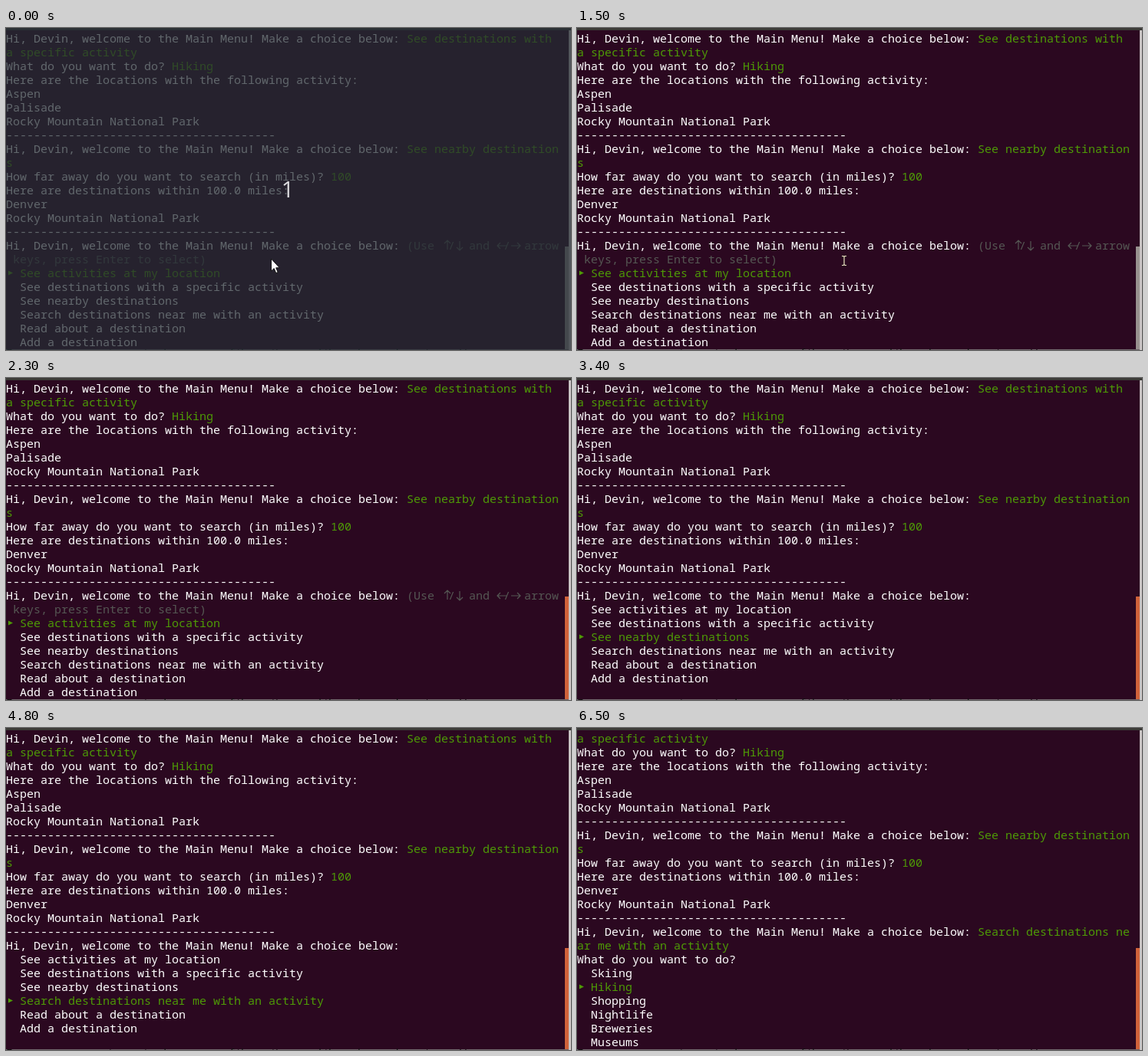
These frames come from a looping animation (736 by 420 pixels, 8 s). An HTML page:

```html
<!DOCTYPE html>
<html lang="en">
<head>
<meta charset="utf-8">
<title>Terminal menu</title>
<style>
  html, body { margin: 0; width: 100%; height: 100%; overflow: hidden; background: #2b0820; }
  svg { display: block; width: 736px; height: 420px; }
  #rows text { font: 15px "Noto Sans Mono", "DejaVu Sans Mono", monospace; white-space: pre; }
  .plain { fill: #fff; }
  .pick { fill: #4e9a06; }
  .hint { fill: #555753; }
  .arrows { fill: none; stroke: #555753; stroke-width: 1.2; }
</style>
</head>
<body>
<svg viewBox="0 0 736 420">
  <rect width="736" height="420" fill="#2b0820"/>
  <g id="rows"></g>
  <rect y="419" width="733" height="1" fill="#6f666b"/>
  <text x="0" y="429" font-family="Open Sans, sans-serif" font-size="15" fill="#111">Every menu prompts you to choose one of the options and then shows places to go. Use arrows</text>
  <rect width="736" height="3" fill="#3c3b37"/>
  <rect id="bar" x="728" y="285" width="5" height="134"/>
  <rect x="733" y="3" width="3" height="417" fill="#c9c4c4"/>
  <g id="beam" fill="none">
    <path d="M345 297.5h2l1 1l1-1h2M345 309.5h2l1-1l1 1h2M348 298v11" stroke="#e8e6c0" stroke-width="1.2"/>
  </g>
  <g id="countdown">
    <rect width="736" height="420" fill="#242d34" opacity=".72"/>
    <text x="367" y="221" text-anchor="middle" font-family="Open Sans, sans-serif" font-size="29" fill="#dcdcdf">1</text>
    <path d="M345.5 301v16l3.7-3.4 2.5 6 2.5-1-2.5-5.8h4.6z" fill="#fff" stroke="#111"/>
  </g>
</svg>
<script>
const LOOP = 8000, CELL = 9, LINE = 18;
const $ = id => document.getElementById(id);
const rows = $("rows");

const GREETING = "Hi, Devin, welcome to the Main Menu! Make a choice below: ";
const QUESTION = "What do you want to do? ";
const RULE = "-".repeat(39);
const HINT = "(Use  /  and  /  arrow keys, press Enter to select)";
const MENU = ["See activities at my location", "See destinations with a specific activity",
  "See nearby destinations", "Search destinations near me with an activity",
  "Read about a destination", "Add a destination"];
const ACTIVITIES = ["Skiing", "Hiking", "Shopping", "Nightlife", "Breweries", "Museums"];

// Each row is a plain part followed by an answer part.
const HISTORY = [
  [GREETING, "See destinations with"],
  ["", "a specific activity"],
  [QUESTION, "Hiking"],
  ["Here are the locations with the following activity:"],
  ["Aspen"], ["Palisade"], ["Rocky Mountain National Park"],
  [RULE],
  [GREETING, "See nearby destination"],
  ["", "s"],
  ["How far away do you want to search (in miles)? ", "100"],
  ["Here are destinations within 100.0 miles:"],
  ["Denver"], ["Rocky Mountain National Park"],
  [RULE]
];
const SEARCHED = [...HISTORY.slice(1), [GREETING, "Search destinations ne"], ["", "ar me with an activity"]];

// Start time, screen and selected option
const STEPS = [
  [0, "menu", 0], [2500, "menu", 1], [3400, "menu", 2], [4000, "menu", 3],
  [4900, "activities", 0], [6500, "activities", 1]
];

const write = (text, col, row, kind) => text
  ? `<text class="${kind}" x="${col * CELL}" y="${19 + row * LINE}">${text}</text>` : "";

function arrows(col, row) {
  const x = col * CELL, y = 14 + row * LINE;
  return `<path class="arrows" d="M${x + 53} ${y + 5}v-12m-4 4l4-4 4 4
    M${x + 69} ${y - 6}v12m-4-4l4 4 4-4
    M${x + 130} ${y}h-12m4-4l-4 4 4 4
    M${x + 136} ${y}h12m-4-4l4 4-4 4"/>`;
}

function hint(col, row) {
  const room = 80 - col;
  return write(HINT.slice(0, room), col, row, "hint")
    + write(HINT.slice(room), 0, row + 1, "hint") + arrows(col, row);
}

function screen(name, selected) {
  const isMenu = name === "menu";
  const past = isMenu ? HISTORY : SEARCHED;
  const prompt = isMenu ? GREETING : QUESTION;
  const options = isMenu ? MENU : ACTIVITIES;
  let out = past.map(([plain, answer], i) =>
    write(plain, 0, i, "plain") + write(answer, plain.length, i, "pick")).join("");
  let row = past.length;
  out += write(prompt, 0, row, "plain");
  if (selected === 0) {
    out += hint(prompt.length, row);
    if (isMenu) row++;
  }
  options.forEach((option, i) => {
    row++;
    out += write(option, 2, row, i === selected ? "pick" : "plain");
    if (i === selected) out += `<path class="pick" d="M3 ${10.5 + row * LINE}l6 3-6 3z"/>`;
  });
  return out;
}

const show = (id, on) => $(id).setAttribute("visibility", on ? "visible" : "hidden");
let current;

function draw(t) {
  const step = STEPS.findLast(([start]) => t >= start);
  if (step !== current) {
    current = step;
    rows.innerHTML = screen(step[1], step[2]);
  }
  const top = t < 4800 ? 285 : 287;
  $("bar").setAttribute("y", top);
  $("bar").setAttribute("height", 419 - top);
  $("bar").setAttribute("fill", t < 1600 ? "#98918f" : "#d0623a");
  show("countdown", t < 500);
  show("beam", t >= 500 && t < 2300);
}

const begin = performance.now();
function tick() {
  draw((performance.now() - begin) % LOOP);
  requestAnimationFrame(tick);
}
tick();
</script>
</body>
</html>
```
